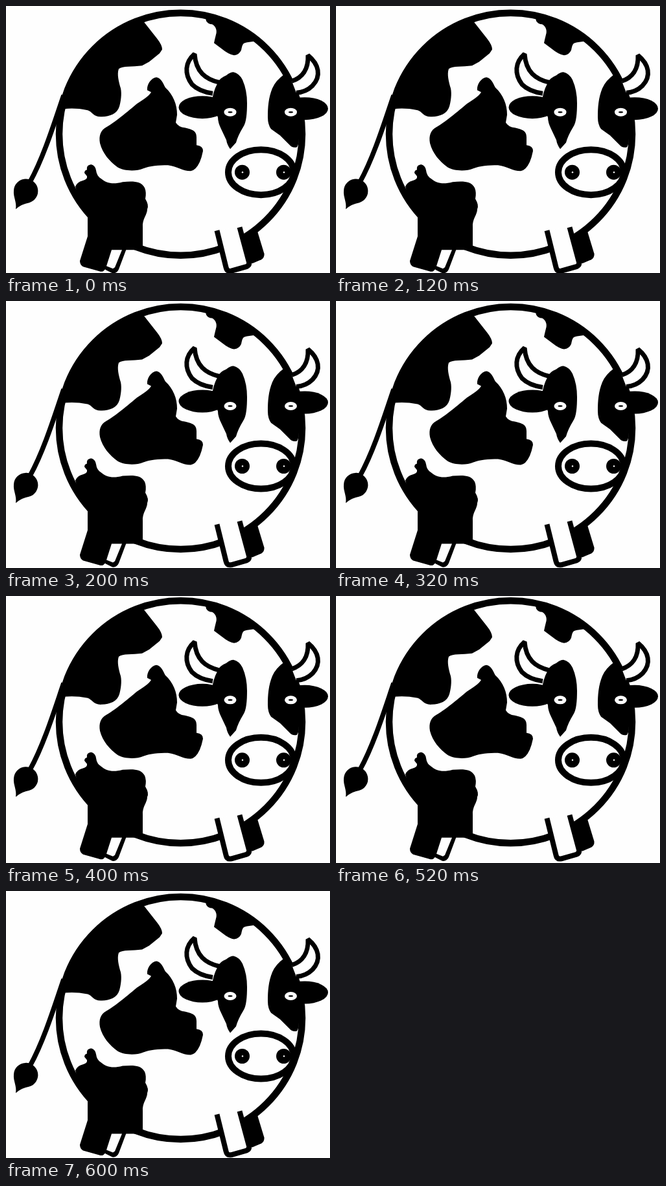
Animation of 500x413 px, one loop 0.8 s. Source, as an HTML page:

```html
<!DOCTYPE html>
<html lang="en">
<head>
<meta charset="utf-8">
<title>Breathing cow</title>
<style>
  html, body { margin: 0; width: 100%; height: 100%; overflow: hidden; background: #fefefe; }
  svg { display: block; width: 100%; height: 100%; }
  .line { fill: #fefefe; stroke: #000; stroke-width: 7; stroke-linejoin: bevel; }
  .white { fill: #fefefe; }
</style>
</head>
<body>
<svg viewBox="0 0 500 413">
  <g id="cow">
    <!-- tail -->
    <path d="M89 138C76 176 59 232 37 272" fill="none" stroke="#000" stroke-width="7.500"/>
    <path d="M15 314C17 303 11 296 12 285A18.700 18.700 0 1 1 36 304Q24 306 15 314Z"/>

    <!-- far front leg -->
    <path d="M364 352L387 345L398.500 383Q399 389 394 392L380 398L370 390Z"/>

    <!-- body and patches -->
    <circle class="line" cx="269.500" cy="198" r="187.500" style="stroke-width:10.500"/>
    <path d="M89 159A187.500 187.500 0 0 1 211 22L233 50Q241 60 241 67L237 73L221 86L210 92C195 94 180 92 174 97C171 105 174 117 177 127C179 136 177 148 175 155C172 166 160 171 148 171C135 172 133 163 126 161C112 158 100 158 89 159Z"/>
    <path d="M307 13L309 23Q312 28 318 28C324 31 326 38 324 44Q322 52 321 57L333 66Q344 75 352 76Q360 75 363 68C365 58 366 57 372 56L386 54A186 186 0 0 0 307 13Z"/>
    <path d="M232 110C240 111 243 121 246 126C258 137 264 152 264 168L262 180Q266 187 276 188C287 191 294 192 294 203L294 215Q304 216 304 224Q302 234 299 241Q293 254 285 255C272 255 265 248 250 246C235 246 222 247 212 251C200 256 182 255 172 249C160 240 149 228 145 212C143 200 146 192 155 187C166 181 188 163 202 151C211 145 221 139 224 133L218 130C217 121 224 111 232 110Z"/>
    <path d="M107 279Q110 272 118 270Q126 268 125 263L121 258Q121 254 125 253C124 247 128 245 132 245Q138 247 139 254Q140 263 147 267C155 274 165 276 180 272C195 271 208 270 214 281Q217 288 215 298Q221 308 218 314C218 323 210 329 211 342L211 371Q211 377 205 377L184 377L150 410Q147 411 144 410L119 403Q114 400 114 394L126 356L126 323Q112 302 107 279Z"/>

    <!-- near legs -->
    <path d="M160 375L152 400Q150 406 154 408L164 413Q171 414 174 407L186 375Z"/>
    <path class="white" d="M163 377L179 377L168 404L165 406L155 402Z"/>
    <path class="white" d="M326 347L361 342L375 400L341 409Z"/>
    <path d="M325.500 347L339.500 404Q341 411 348 409.500L371 403Q376 401 375 396L360.500 342" fill="none" stroke="#000" stroke-width="8"/>

    <!-- horns -->
    <path class="line" d="M329 118C308 113 293 102 291 74C276 87 275 105 287 121Q298 132 319 135"/>
    <path class="line" d="M441 116C457 111 467 98 466 76C483 90 487 108 473 123Q463 133 448 134"/>

    <!-- face -->
    <ellipse cx="303" cy="156.500" rx="36.500" ry="17.500"/>
    <ellipse cx="461" cy="158.500" rx="36" ry="17.500"/>
    <path d="M351 102Q360 104 365 114Q372 130 372 150C372 165 371 180 366 187Q358 200 355 211L346 221Q341 214 340 207L332 190Q327 180 327 172L318 150Q318 135 327 118Q330 111 340 107Q346 102 351 102Z"/>
    <path d="M430 105Q416 115 411 127C405 142 404 156 404 172Q404 183 409 190L423 200L437 214Q442 220 449 218Q452 214 452 205L458 196Q456 138 430 105Z"/>
    <g id="eye">
      <ellipse class="white" cx="346" cy="164" rx="9.500" ry="6.500"/>
      <ellipse cx="346" cy="164" rx="3.500" ry="1.200"/>
    </g>
    <use href="#eye" x="93.500"/>
    <ellipse class="line" cx="393.500" cy="257" rx="50.500" ry="35" style="stroke-width:10"/>
    <g id="nostril">
      <circle cx="364.500" cy="257" r="11.500"/>
      <circle class="white" cx="365" cy="257" r="1.200"/>
    </g>
    <use href="#nostril" x="64"/>
  </g>
</svg>
<script>
  const cow = document.getElementById("cow");
  const STEP = 200;
  const LIFT = 1.7;
  const BASE = 0.2;

  function draw(now) {
    const phase = Math.floor(now / STEP) % 4;
    const height = 2 - Math.abs(2 - phase);
    cow.setAttribute("transform", `translate(0 ${BASE - LIFT * height})`);
    requestAnimationFrame(draw);
  }
  draw(performance.now());
</script>
</body>
</html>
```
